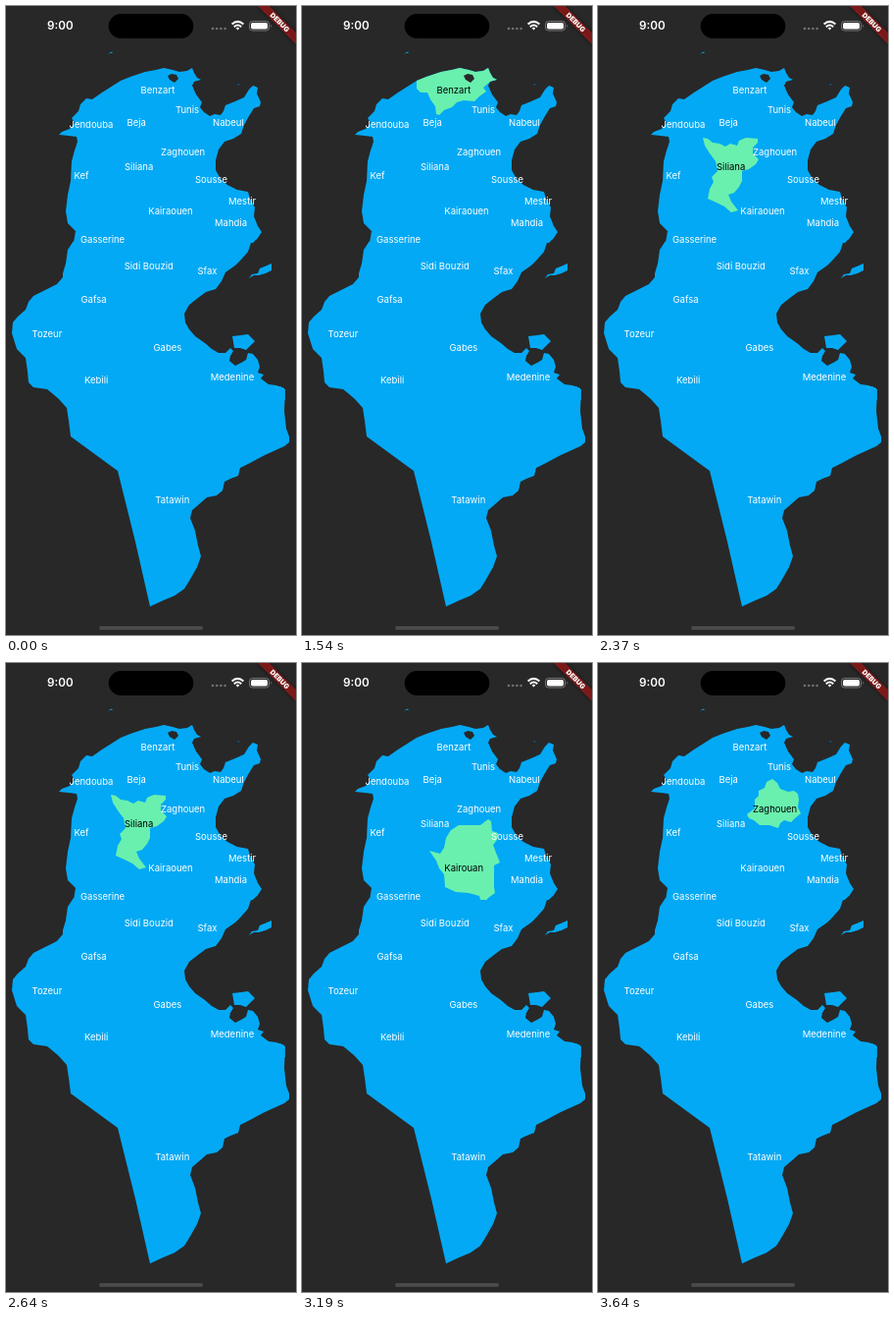
Animation, 296 px wide and 640 px high, one loop 3700 ms. Source, as an HTML page:

```html
<!DOCTYPE html>
<html lang="en">
<head>
<meta charset="utf-8">
<title>Region map</title>
<style>
  html, body { margin: 0; width: 100%; height: 100%; overflow: hidden; background: #282828; }
  svg { display: block; width: 100vw; height: 100vh; }
  text { font-family: Inter, Roboto, sans-serif; }
  .land { fill: #03a9f4; }
  .sea { fill: #282828; }
  .labels { font-size: 9.5px; fill: #fff; }
  .lit { opacity: var(--on, 0); }
  .rest { opacity: calc(1 - var(--on, 0)); }
  .regions { fill: #69f0ae; }
  text.lit { fill: #000; }

  /* Each region is selected for one window of the loop. */
  .benzart, .beja, .siliana, .kairouan, .zaghouen { animation: 3.7s step-end infinite; }
  .benzart { animation-name: benzart; }
  .beja { animation-name: beja; }
  .siliana { animation-name: siliana; }
  .kairouan { animation-name: kairouan; }
  .zaghouen { animation-name: zaghouen; }
  @keyframes benzart { 0% { --on: 0 } 41.6216% { --on: 1 } 52.4324%, 100% { --on: 0 } }
  @keyframes beja { 0% { --on: 0 } 52.4324% { --on: 1 } 64.0540%, 100% { --on: 0 } }
  @keyframes siliana { 0% { --on: 0 } 64.0540% { --on: 1 } 86.2162%, 100% { --on: 0 } }
  @keyframes kairouan { 0% { --on: 0 } 86.2162% { --on: 1 } 98.3783%, 100% { --on: 0 } }
  @keyframes zaghouen { 0% { --on: 0 } 98.3783%, 100% { --on: 1 } }
</style>
</head>
<body>
<svg viewBox="0 0 296 640" preserveAspectRatio="none">
  <defs>
    <path id="north" d="M69 241 71 229 63 221 61 209 63 192 66 178 67 158 70 147 73 138 72 133 64 132 54 131 57 128 65 125 70 119 67 114 74 107 76 100 82 94 88 95 98 88 106 83 117 76 127 72 142 67 153 65 161 63 170 65 177 67 185 66 190 63 192 68 195 73 199 75 192 77 190 81 194 90 200 98 198 103 202 108 208 112 213 110 219 111 222 107 224 101 234 97 243 93 248 85 252 81 257 83 256 89 260 98 259 102 253 104 248 112 243 121 240 130 232 135 223 138 217 146 214 157 214 167 219 176 226 182 236 187 247 189 249 196 254 205 253 214 257 224 261 230 257 236 252 241Z"/>
    <path id="middle" d="M69 239 257 236 250 241 247 250 240 258 234 264 224 271 220 280 214 288 204 291 196 297 187 304 182 313 183 322 187 329 193 336 203 343 210 349 217 353 224 353 229 348 232 351 229 356 228 361 234 366 240 363 245 360 247 353 252 354 257 360 259 367 257 373 263 375 260 379 268 385 276 386 284 389 285 401 67 401 47 394 42 390 28 388 23 383 22 372 20 358 11 349 6 333 7 322 12 316 20 309 23 301 28 295 42 288 52 283 58 276 58 272 61 262 63 248Z"/>
    <path id="south" d="M47 394 60 385 280 387 285 390 284 412 286 430 289 438 289 444 284 448 264 457 249 465 239 470 237 478 229 481 223 484 221 493 215 498 205 500 197 507 190 513 188 521 193 534 196 549 199 560 195 571 187 585 182 593 172 600 160 605 147 611 132 545 114 473 66 438 64 422 62 409 54 400Z"/>
    <clipPath id="coast"><use href="#north"/></clipPath>
    <filter id="soft" x="-20%" y="-80%" width="140%" height="260%"><feGaussianBlur stdDeviation="2"/></filter>
  </defs>

  <g class="land">
    <use href="#north"/>
    <use href="#middle"/>
    <use href="#south"/>
    <path d="M231 336 240 335 247 334 254 341 249 346 245 350 239 348 233 348Z"/>
    <path d="M248 277 251 273 257 272 259 267 264 265 271 262 271 269 265 272 258 274 253 274Z"/>
    <path d="M104 48.5 108 46.5 109 47.5Z M236 79 238 80 238 81Z"/>
  </g>

  <g class="regions" clip-path="url(#coast)">
    <path class="lit benzart" d="M117 70 130 62 199 60 201 75 192 77 185 83 188 87 181 92 176 97 165 96 158 98 153 103 145 106 140 111 137 110 136 102 131 95 128 88 121 88 117 84Z"/>
    <path class="lit beja" d="M105 97 105 82 116 73 117 86 124 88 129 91 129 97 135 104 138 109 143 108 149 104 157 108 164 115 170 124 166 129 160 133 150 135 142 140 135 138 130 140 124 140 113 136 118 127 113 120 110 108Z"/>
    <path class="lit siliana" d="M107 134 112 135 117 139 124 140 130 143 135 140 142 142 144 137 151 134 163 135 163 139 158 144 158 150 164 156 161 161 154 166 147 168 147 178 144 184 139 190 133 192 136 199 143 208 136 210 129 204 121 200 112 196 114 186 118 179 116 174 122 168 120 158 114 150 109 142Z"/>
    <path class="lit kairouan" d="M130 191 141 194 145 188 147 178 152 170 160 165 172 165 182 165 190 159 193 161 194 171 200 173 199 180 195 185 198 193 202 203 196 206 196 216 196 228 197 234 190 239 184 247 181 237 170 234 157 233 146 228 145 215 140 209 137 201Z"/>
    <path class="lit zaghouen" d="M178 118 183 122 186 128 194 131 200 130 204 133 205 139 204 147 207 153 201 158 197 162 190 160 186 163 184 168 175 165 165 165 159 160 154 158 152 154 160 148 160 139 164 135 164 130 170 127 172 121Z"/>
  </g>
  <path class="sea" d="M165 71 169 69 174 70 176 74 172 78 167 75Z"/>

  <g class="labels">
    <text class="rest benzart" x="137.5" y="89">Benzart</text>
    <text class="lit benzart" x="137.5" y="89">Benzart</text>
    <text class="rest beja" x="123.5" y="121.5">Beja</text>
    <text class="lit beja" x="123.5" y="121.5">Beja</text>
    <text class="rest siliana" x="121" y="167">Siliana</text>
    <text class="lit siliana" x="121" y="167">Siliana</text>
    <text class="rest kairouan" x="145.3" y="212">Kairaouen</text>
    <text class="lit kairouan" x="145.3" y="212">Kairouan</text>
    <text class="rest zaghouen" x="158" y="152.3">Zaghouen</text>
    <text class="lit zaghouen" x="158" y="152.3">Zaghouen</text>
    <text x="173" y="109">Tunis</text>
    <text x="64.5" y="124">Jendouba</text>
    <text x="211" y="121.5">Nabeul</text>
    <text x="69.5" y="176">Kef</text>
    <text x="193" y="179.5">Sousse</text>
    <text x="227" y="201.5">Mestir</text>
    <text x="213" y="224">Mahdia</text>
    <text x="76" y="240.5">Gasserine</text>
    <text x="120.7" y="267.5">Sidi Bouzid</text>
    <text x="195.5" y="272.5">Sfax</text>
    <text x="76.5" y="302">Gafsa</text>
    <text x="26.5" y="337">Tozeur</text>
    <text x="150.5" y="351">Gabes</text>
    <text x="80" y="383.5">Kebili</text>
    <text x="208.7" y="381.3">Medenine</text>
    <text x="152.3" y="506">Tatawin</text>
  </g>

  <!-- Status bar -->
  <text x="55.3" y="24.2" font-size="11.7" font-weight="600" fill="#fff" text-anchor="middle">9:00</text>
  <rect x="104.7" y="8" width="86.6" height="25" rx="12.5"/>
  <path d="M211 23H224" stroke="#707070" stroke-width="2.6" stroke-linecap="round" stroke-dasharray="0 4.2"/>
  <g fill="none" stroke="#fff" stroke-width="2">
    <path d="M230.6 18.6Q236.5 13.2 242.4 18.6M232.8 21.2Q236.5 17.8 240.2 21.2"/>
    <path d="M234.6 22.6Q236.5 21 238.4 22.6L236.5 24.6Z" fill="#fff" stroke="none"/>
  </g>
  <rect x="248.5" y="15.5" width="20" height="9.5" rx="3" fill="none" stroke="#8c8c8c" stroke-width=".8"/>
  <rect x="250" y="17" width="17" height="6.5" rx="1.8" fill="#fff"/>
  <path d="M270 18.7Q271.6 20.2 270 21.8Z" fill="#8c8c8c"/>

  <!-- Corner banner -->
  <g transform="translate(296 0) rotate(45)">
    <rect x="-27.5" y="19.3" width="55" height="8.2" opacity=".5" filter="url(#soft)"/>
    <rect x="-27.5" y="19.3" width="55" height="8.2" fill="#b71c1c" opacity=".63"/>
    <text y="25.9" font-size="7" font-weight="900" fill="#fff" text-anchor="middle">DEBUG</text>
  </g>

  <rect x="95" y="631" width="106" height="3.8" rx="1.9" fill="#4b4b4b"/>
</svg>
</body>
</html>
```
